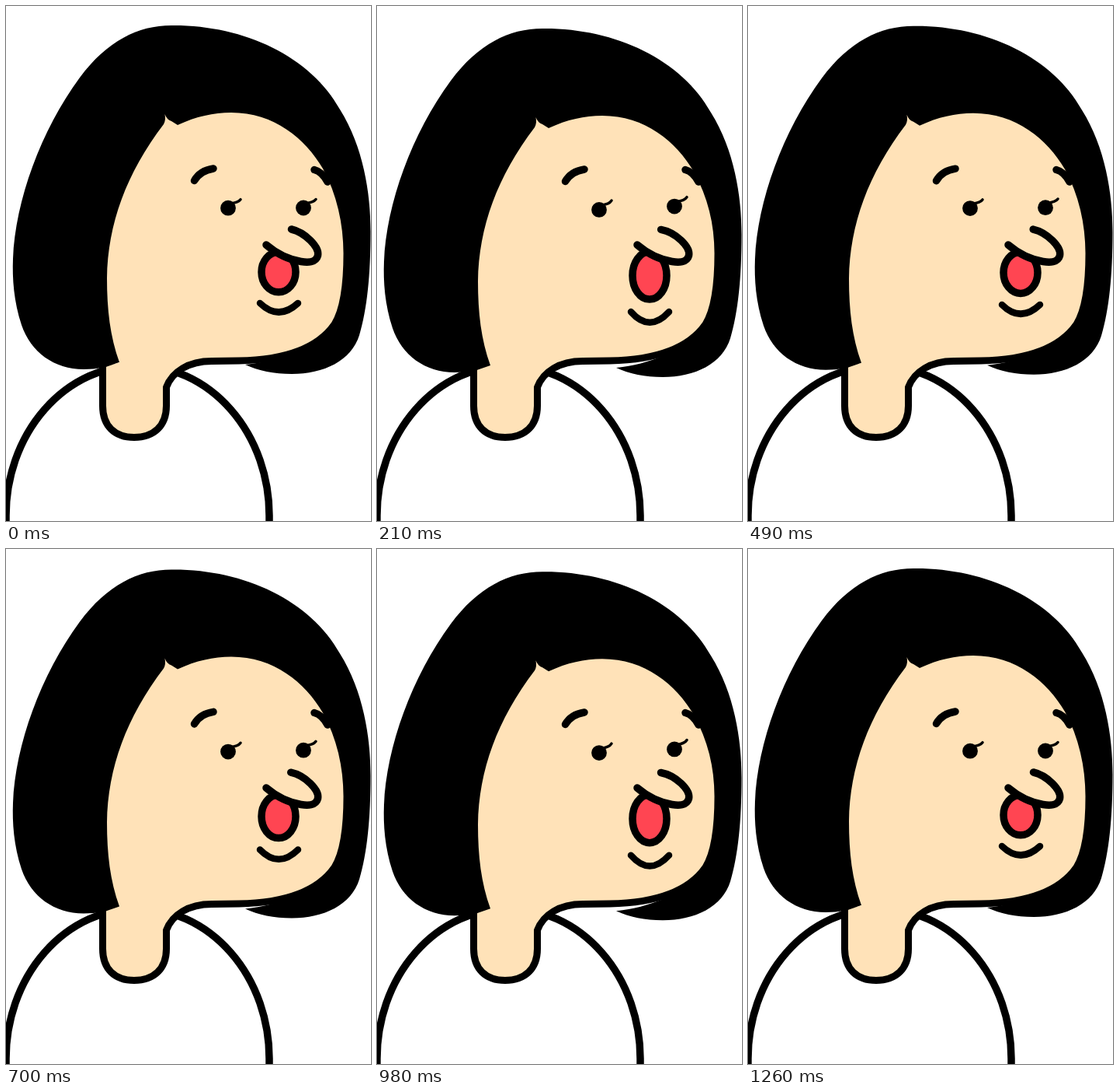
Recreate the animation shown at these times as an HTML page with a canvas. Size 470 by 662 pixels, loop 1330 ms.

```html
<!DOCTYPE html>
<html lang="en">
<head>
<meta charset="utf-8">
<title>Talking face</title>
<style>
  html, body { margin: 0; width: 100%; height: 100%; overflow: hidden; background: #fff; }
  canvas { display: block; }
</style>
</head>
<body>
<canvas id="stage" width="470" height="662"></canvas>
<script>
const ctx = document.getElementById('stage').getContext('2d');
const INK = '#000', SKIN = '#ffe2b8', RED = '#ff4552';
const STEP = 70, LOOP = 1330, FIRST = 560, SECOND = 700;

const JAW = 'C214 470 235 456.5 265 456.5 L300 456 C355 455 400 442 423 409 C436 388 439 350 439 318';
const JAW_BACK = 'C439 350 436 388 423 409 C400 442 355 455 300 456 L265 456.5 C235 456.5 214 470 206.5 490';
const NECK = 'M124.5 464 V514 C124.5 540 140 554.5 165 554.5 C190 554.5 206.5 540 206.5 514 V490 ';
const NECK_BACK = 'V514 C206.5 540 190 554.5 165 554.5 C140 554.5 124.5 540 124.5 514';

const body = new Path2D('M0 670 V655 A169.5 193 0 0 1 339 655 V670');
const outline = new Path2D(NECK + JAW);
const hair = new Path2D(`M213 25 C305 24 392 64 430 133 C460 181 469.5 240 469.5 290
  C469.5 345 465 390 455 423 C445 456 409 473 368 473 C345 473 325 469 308 461
  C330 459 350 453 368 446 L400 400 H200 L146 458 C130 464 118 467 100 467
  C62 467 32 445 20 410 C10 380 8 350 9 325 C12 250 45 160 95 92 C130 45 170 25 213 25Z`);

function fill(path, color) {
  ctx.fillStyle = color;
  ctx.fill(path);
}

function line(path, width = 9.5) {
  ctx.strokeStyle = INK;
  ctx.lineWidth = width;
  ctx.stroke(typeof path === 'string' ? new Path2D(path) : path);
}

// Upper edge follows the hair by d; the jaw and neck stay put.
function skinPath(d) {
  return new Path2D(`M204.5 ${139 + d} Q207 ${146 + d} 213 ${148 + d} L221 ${153 + d}
    C245 ${142 + d} 267 ${137 + d} 290 ${137 + d} C345 ${137 + d} 385 ${170 + d} 408 ${209 + d}
    C426 ${242 + d} 434.5 280 434.5 318 L439 318 ${JAW_BACK} ${NECK_BACK}
    V${466 + d} L130 ${463.5 + d} L146 ${458 + d}
    C134 ${425 + d} 130 ${390 + d} 130 ${350 + d}
    C131 ${280 + d} 155 ${215 + d} 203 ${152 + d} Q206 ${147 + d} 204.5 ${139 + d}Z`);
}

function eye(x, y, lift) {
  const dot = new Path2D();
  dot.arc(x, y, 9.9, 0, Math.PI * 2);
  fill(dot, INK);
  line(`M${x + 3} ${y - 6} Q${x + 13} ${y - 7} ${x + 16} ${y - 11 - lift}`, 3.5);
}

// open: 0 for the smallest mouth, 1 for the widest.
function draw(open) {
  const drop = 4.6 * open;
  ctx.fillStyle = '#fff';
  ctx.fillRect(0, 0, 470, 662);
  ctx.lineJoin = 'round';

  ctx.lineCap = 'butt';
  line(body);
  ctx.save();
  ctx.translate(0, drop);
  fill(hair, INK);
  ctx.restore();
  fill(skinPath(drop), SKIN);
  line(outline, 9);

  ctx.lineCap = 'round';
  const brow = 1.1 * open;
  line(`M242.5 ${224.5 + brow} Q250 ${211.5 + brow} 267 ${209 + brow}`);
  line('M397 210.5 Q407 213 414 226');
  eye(286, 259.7 + 2.6 * open, open);
  eye(383, 259.5 - 2.3 * open, open);

  const mouth = new Path2D();
  mouth.ellipse(351, 342 + 5.2 * open, 22, 25.8 + 5.7 * open, 0, 0, Math.PI * 2);
  fill(mouth, RED);
  line(mouth);

  const nose = new Path2D(`M${367.5 - 2.2 * open} ${287 + 0.5 * open} C385 291 404 310 401.5 321
    C399 330 388 330 380 328.5 C364 326 348 318 335 307`);
  fill(nose, SKIN);
  line(nose);

  const chin = 382 + 13 * open;
  line(`M327 ${chin} Q351 ${405 + 18 * open} 376 ${chin}`, 8.5);
}

// Two talking beats, the second a little slower, then a short rest.
function openness(t) {
  if (t >= FIRST + SECOND) return 0;
  const phase = t < FIRST ? t / FIRST : (t - FIRST) / SECOND;
  return Math.sin(Math.PI * phase) ** 2;
}

function tick() {
  const t = performance.now() % LOOP;
  draw(openness(Math.floor(t / STEP) * STEP));
  requestAnimationFrame(tick);
}
tick();
</script>
</body>
</html>
```
